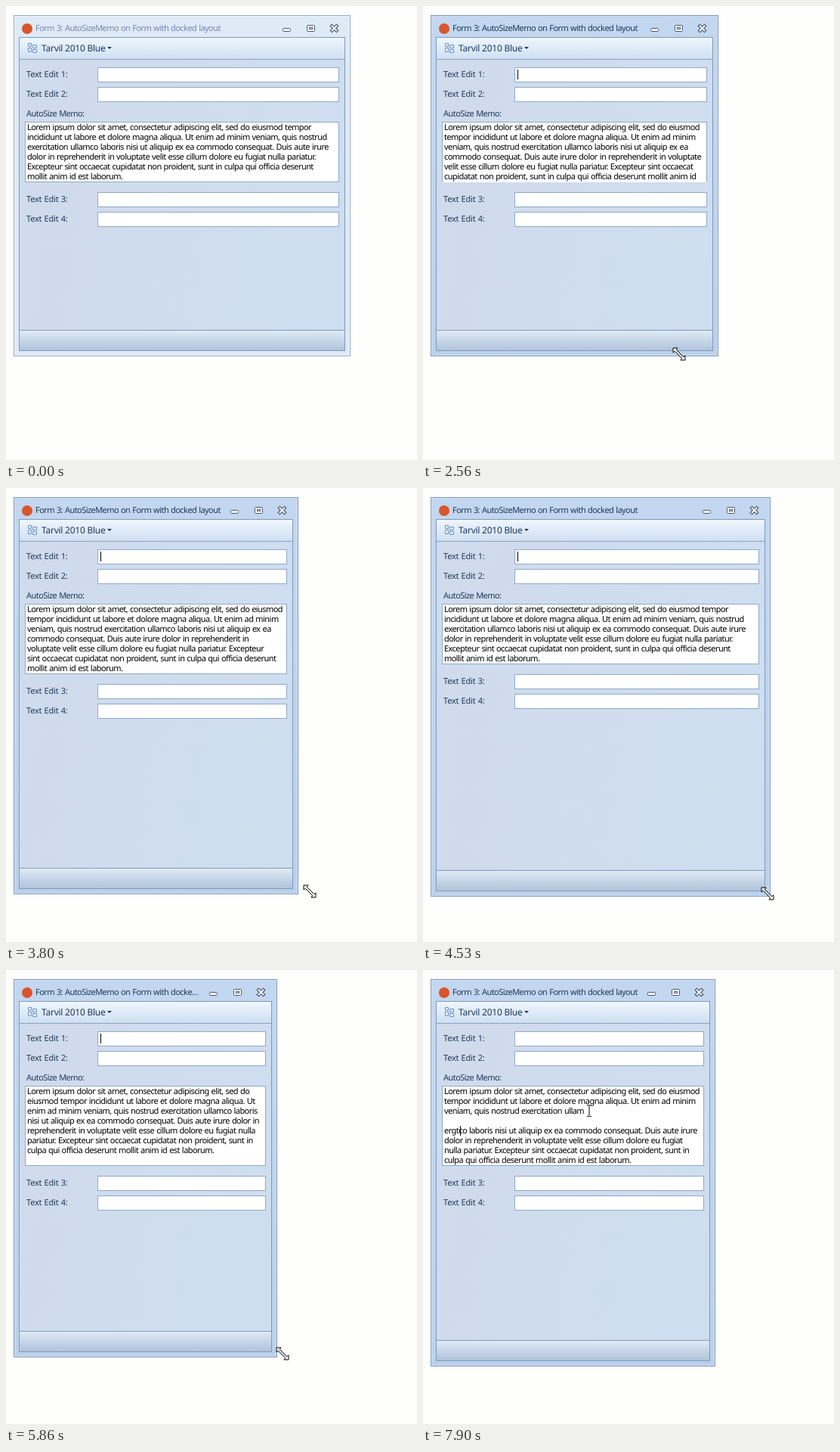
Recreate the animation shown at these times as an HTML page. Size 544x600 px, loop 8000 ms.

```html
<!DOCTYPE html>
<html lang="en">
<head>
<meta charset="utf-8">
<title>AutoSizeMemo</title>
<style>
html, body { margin: 0; width: 100%; height: 100%; overflow: hidden; background: #fefefd; }
* { box-sizing: border-box; }
body {
  font: 11px "Noto Sans", "Open Sans", sans-serif;
  letter-spacing: -.555px; word-spacing: .6px;
  text-rendering: geometricPrecision; color: #1e395b;
}
div, svg { position: absolute; }
#win {
  left: 10px; top: 12px; background: #dfeaf7;
  box-shadow: inset 0 0 0 1px #97abc4, inset 0 0 0 2px #edf4fc;
}
#win.active { background: linear-gradient(#c3d7f0, #bbd1ea); box-shadow: inset 0 0 0 1px #8298b5, inset 0 0 0 2px #cfe0f4; }
#logo { left: 11px; top: 11px; width: 14px; height: 14px; border-radius: 50%; background: #d9562b; }
#title {
  left: 29px; right: 100px; top: 8px; line-height: 20px; color: #7388b3;
  white-space: nowrap; overflow: hidden; text-overflow: ellipsis;
}
.active #title { color: #1e395b; }
#buttons { right: 13px; top: 10px; }
#client {
  left: 7px; right: 7px; top: 29px; bottom: 7px; overflow: hidden;
  border: 1px solid #7e9abd; background: linear-gradient(100deg, #d0dbec, #cedef0);
}
#bar {
  left: 0; right: 0; top: 0; height: 29px; border-bottom: 1px solid #8ba2c0;
  background: linear-gradient(#eff6fd, #dfebf8 50%, #cfdff2);
}
#menu {
  left: 29px; top: 4px; line-height: 20px; white-space: nowrap;
  font-size: 12px; letter-spacing: -.25px; word-spacing: 0;
}
#status {
  left: 0; right: 0; bottom: 0; height: 27px; border-top: 1px solid #7e9abd;
  background: linear-gradient(#e0eaf6, #c9d8ea 45%, #b2c4da);
}
#fields { left: 15px; right: 15px; top: 69px; }
.row { position: relative; height: 20px; margin-bottom: 6px; padding-left: 2px; line-height: 20px; letter-spacing: -.2px; }
.row.memo { margin: 0; letter-spacing: -.555px; }
.box, #memo { background: #fff; border: 1px solid #8fa8c9; }
.box { left: 96px; right: 0; top: 0; height: 20px; }
#memo { position: relative; margin-bottom: 13px; overflow: hidden; color: #000; }
#text { left: 2px; top: 0; line-height: 13px; white-space: pre; }
.caret { width: 1px; height: 13px; background: #000; }
#editCaret { left: 3px; top: 2px; }
</style>
</head>
<body>
<div id="win">
  <div id="logo"></div>
  <div id="title">Form 3: AutoSizeMemo on Form with docked layout</div>
  <svg id="buttons" width="80" height="16" fill="#fff" stroke="#47576e">
    <rect x="3.5" y="7.5" width="10" height="4" rx="1"/>
    <rect x="35.5" y="3.5" width="10" height="8" rx="1"/>
    <rect x="38.5" y="6.5" width="4" height="2"/>
    <g stroke-linecap="square">
      <path d="M68.5 4.5l6 6m0-6l-6 6" stroke-width="4.4"/>
      <path d="M68.5 4.5l6 6m0-6l-6 6" stroke="#fff" stroke-width="2"/>
    </g>
  </svg>
  <div id="client">
    <div id="bar">
      <svg width="130" height="28" fill="#e4effb" stroke="#6d93c4">
        <path d="M11.5 7.5h4v4h-4zM17.5 9.5h5v4h-5zM11.5 13.5h4v5h-4zM17.5 15.5h5v4h-5z"/>
        <path d="M116 12h6l-3 3z" fill="#1e395b" stroke="none"/>
      </svg>
      <div id="menu">Tarvil 2010 Blue</div>
    </div>
    <div id="status"></div>
  </div>
  <div id="fields">
    <div class="row">Text Edit 1:<div class="box"><div class="caret" id="editCaret"></div></div></div>
    <div class="row">Text Edit 2:<div class="box"></div></div>
    <div class="row memo">AutoSize Memo:</div>
    <div id="memo"><div id="text"></div><div class="caret" id="memoCaret"></div></div>
    <div class="row">Text Edit 3:<div class="box"></div></div>
    <div class="row">Text Edit 4:<div class="box"></div></div>
  </div>
</div>
<svg width="544" height="600" style="left:0;top:0"><path id="pointer" fill="#fff" stroke="#000"/></svg>

<script>
const $ = id => document.getElementById(id);
const LOOP = 8000, LAG = 40;
const PRESS = 2160, RELEASE = 6100, CLICK = 6930, TYPE = 7630, KEY = 53;

const head = 'Lorem ipsum dolor sit amet, consectetur adipiscing elit, sed do eiusmod tempor ' +
  'incididunt ut labore et dolore magna aliqua. Ut enim ad minim veniam, quis nostrud exercitation ullam';
const tail = 'co laboris nisi ut aliquip ex ea commodo consequat. Duis aute irure dolor in ' +
  'reprehenderit in voluptate velit esse cillum dolore eu fugiat nulla pariatur. Excepteur sint ' +
  'occaecat cupidatat non proident, sunt in culpa qui officia deserunt mollit anim id est laborum.';
const keys = '\n\nergt';

// eased pointer moves: begin, end, x, y
const moves = [
  [600, 1100, 453, 456], [1300, 1400, 453, 463], [1700, 1830, 452, 459],
  [2400, 2690, 265, 460], [2690, 3160, 265, 508],
  [3230, 3410, 265, 530], [3410, 3980, 432, 534], [4060, 4260, 456, 536],
  [4590, 5090, 258, 520], [5400, 6040, 383, 505], [6040, 6090, 383, 520],
  [6090, 6460, 224, 159], [6600, CLICK, 220, 186]
];

const shapes = {
  size: 'M-8-8H-2L-3.7-5.7 5.7 3.7 8 2V8H2L3.7 5.7-5.7-3.7-8-2Z',
  arrow: 'M.5.5V16.5L4 13 6.5 18.5 9 17.5 6.5 12H11.5Z',
  beam: 'M-3-7.5H-.5M.5-7.5H3M0-7V7M-3 7.5H-.5M.5 7.5H3'
};

// letters by advance in px, for word wrap; all others take 6
const byAdvance = { 2: 'il', 3: ' j', 4: 'frt,.', 5: 'cksL', 7: 'UD', 8: 'mw' };
const advance = c => +(Object.keys(byAdvance).find(w => byAdvance[w].includes(c)) || 6);
const width = s => [...s].reduce((sum, c) => sum + advance(c), 0);

function wrap(text, max) {
  return text.split('\n').flatMap(part => {
    const lines = [];
    let line = '';
    part.split(' ').forEach((word, i) => {
      const longer = i ? line + ' ' + word : word;
      if (i && width(longer) > max) {
        lines.push(line);
        line = word;
      } else line = longer;
    });
    return [...lines, line];
  });
}

const clamp = (v, lo, hi) => Math.min(Math.max(v, lo), hi);
const ease = u => u * u * u * (10 - 15 * u + 6 * u * u);
const px = v => v + 'px';

function pointerAt(t) {
  let x = 334, y = 616;
  for (const [begin, end, toX, toY] of moves) {
    const f = ease(clamp((t - begin) / (end - begin), 0, 1));
    x += (toX - x) * f;
    y += (toY - y) * f;
  }
  return [Math.round(x), Math.round(y)];
}

// the dragged corner trails the pointer
const cornerAt = t => pointerAt(clamp(t - LAG, 2400, 6090)).map(v => v + 4);

function shapeAt(t, x, y) {
  if (t < PRESS) return x < 454 && y <= 463 ? 'size' : 'arrow';
  if (t < RELEASE) return 'size';
  return y < 246 || (y > 259 && y < 305) ? 'beam' : 'arrow';
}

function draw(t) {
  const [right, bottom] = cornerAt(t);
  const active = t >= PRESS, clicked = t >= CLICK;
  $('win').className = active ? 'active' : '';
  $('win').style.width = px(right - 10);
  $('win').style.height = px(bottom - 12);

  // the memo's height follows its text with the same delay
  const typed = keys.slice(0, Math.max(0, Math.floor((t - TYPE) / KEY) + 1));
  const text = head + typed + tail;
  const lines = wrap(text, right - 46);
  const rows = wrap(text, cornerAt(t - LAG)[0] - 46).length;
  $('text').textContent = lines.join('\n');
  $('memo').style.height = px(rows * 13 + 2);
  $('memo').style.borderBottomColor = rows < lines.length ? '#fff' : '';

  const before = wrap(head + typed, right - 46);
  const caret = $('memoCaret').style;
  caret.left = px(3 + width(before[before.length - 1]));
  caret.top = px(before.length * 13 - 13);
  caret.display = clicked && (t < CLICK + 530 || typed) ? '' : 'none';
  $('editCaret').style.display = active && !clicked ? '' : 'none';

  const [x, y] = pointerAt(t);
  $('pointer').setAttribute('d', shapes[shapeAt(t, x, y)]);
  $('pointer').setAttribute('transform', `translate(${x} ${y})`);
}

const start = performance.now();
function frame() {
  draw((performance.now() - start) % LOOP);
  requestAnimationFrame(frame);
}
frame();
</script>
</body>
</html>
```
